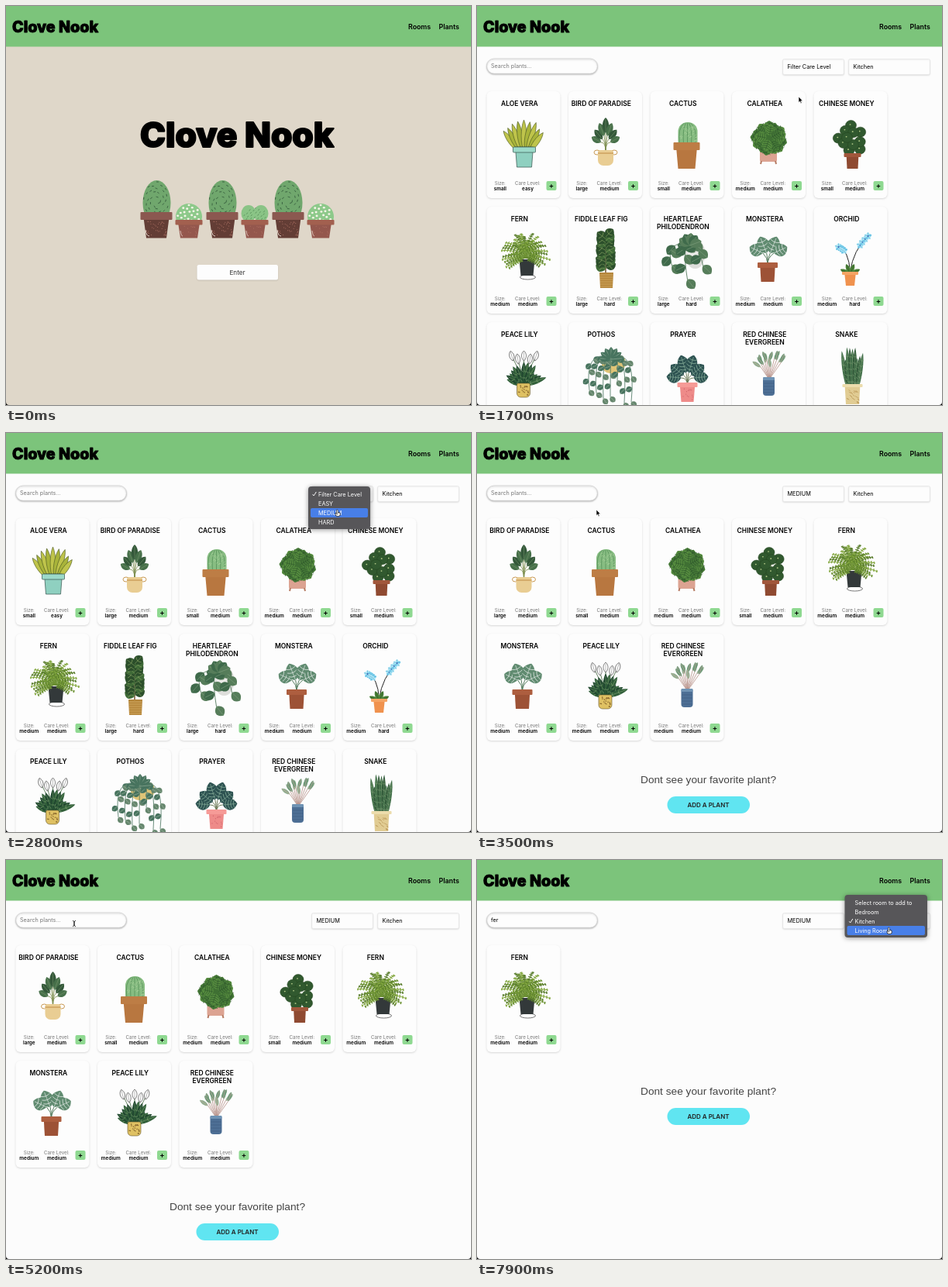
Animation, 600 px wide and 515 px high, one loop 8 s. Source, as an HTML page with a canvas:

```html
<!DOCTYPE html>
<html lang="en">
<head>
<meta charset="utf-8">
<title>Clove Nook</title>
<style>
html, body { margin: 0; width: 100%; height: 100%; overflow: hidden; }
canvas { display: block; }
</style>
</head>
<body>
<canvas id="stage" width="600" height="515"></canvas>
<script>
const g = document.getElementById('stage').getContext('2d');
const LOOP = 8000, STEP = 100;
const NAME = 'Clove Nook';
const SANS = 'Inter, Roboto, sans-serif';
const PAPER = '#fdfdfd';
const { abs, sin, cos, sqrt, floor, PI } = Math;
const rnd = i => { const v = sin(i * 12.9898 + 4) * 43758.5453; return v - floor(v); };

// ---- drawing helpers ----
function text(s, x, y, size, { weight = 400, color = '#000', align = 'left', family = SANS } = {}) {
  g.font = `${weight} ${size}px ${family}`;
  g.fillStyle = color;
  g.textAlign = align;
  g.fillText(s, x, y);
}

function logo(x, y, size, align) {
  text(NAME, x, y, size, { weight: 800, align });
  g.strokeStyle = '#000';
  g.lineWidth = size / 20;
  g.lineJoin = 'round';
  g.strokeText(NAME, x, y);
}

function paint(fill, stroke, width = 0.7) {
  if (fill) { g.fillStyle = fill; g.fill(); }
  if (stroke) { g.strokeStyle = stroke; g.lineWidth = width; g.stroke(); }
}

function box(x, y, w, h, r, fill, stroke, width) {
  g.beginPath();
  g.roundRect(x, y, w, h, r);
  paint(fill, stroke, width);
}

function raised(alpha, blur, ...rect) {
  g.save();
  g.shadowColor = `rgba(0,0,0,${alpha})`;
  g.shadowBlur = blur;
  g.shadowOffsetY = 1;
  box(...rect);
  g.restore();
}

function oval(x, y, rx, ry, fill, stroke, width) {
  g.beginPath();
  g.ellipse(x, y, rx, ry, 0, 0, 7);
  paint(fill, stroke, width);
}

// Tapered pot with a rim on top.
function pot(x, y, top, bottom, h, fill, rim, rimH, stroke) {
  g.beginPath();
  for (const [dx, dy] of [[-top, 0], [top, 0], [bottom, h], [-bottom, h]]) g.lineTo(x + dx, y + dy);
  g.closePath();
  paint(fill, stroke);
  if (rim) box(x - top - 3, y, top * 2 + 6, rimH, 1, rim, stroke);
}

function curve([x, y, cx, cy, ex, ey], color, width = 0.8) {
  g.beginPath();
  g.moveTo(x, y);
  g.quadraticCurveTo(cx, cy, ex, ey);
  paint(null, color, width);
}

const line = (x, y, ex, ey, color, width) => curve([x, y, x, y, ex, ey], color, width);
const pointOn = ([x, y, cx, cy, ex, ey], s, u = 1 - s) =>
  [u * u * x + 2 * u * s * cx + s * s * ex, u * u * y + 2 * u * s * cy + s * s * ey];

// Leaf growing from (x, y); angle 0 points up.
function leaf(x, y, angle, len, w, fill, vein, ribs = 0, outline) {
  g.save();
  g.translate(x, y);
  g.rotate(angle * PI / 180);
  g.beginPath();
  g.moveTo(0, 0);
  g.bezierCurveTo(-w, -len * 0.25, -w, -len * 0.75, 0, -len);
  g.bezierCurveTo(w, -len * 0.75, w, -len * 0.25, 0, 0);
  paint(fill, outline, 0.6);
  if (vein) line(0, 0, 0, -len * 0.9, vein, 0.5);
  for (let i = 1; i <= ribs; i++) {
    const y = -len * i / (ribs + 1.5);
    curve([-w * 0.6, y - 2, 0, y + 2, w * 0.6, y - 2], vein, 0.6);
  }
  g.restore();
}

// Calls f with u going from -1 to 1 in n steps.
function fan(n, f) {
  for (let i = 0; i < n; i++) f(i / (n - 1) * 2 - 1, i);
}

// Spreads n points evenly over a disc, outermost first.
function disc(n, f) {
  for (let i = 0; i < n; i++) {
    const a = i * 137.5, r = sqrt(1 - i / n), t = a * PI / 180;
    f(sin(t) * r, -cos(t) * r, a, i);
  }
}

function specks(n, x, y, w, h, draw) {
  for (let i = 0; i < n; i++) draw(x + rnd(i) * w, y + rnd(i + 50) * h, i);
}

const dots = (n, x, y, w, h, color, r = 0.5) => specks(n, x, y, w, h, (px, py) => oval(px, py, r, r, color));

function vine(stem, n, size, colors, vein) {
  curve(stem, colors[0]);
  for (let k = 1; k <= n; k++) {
    const [x, y] = pointOn(stem, k / n);
    leaf(x, y, (k % 2 ? 120 : 220) + rnd(k + stem[4]) * 30, size, size * 0.55, colors[k % 2], vein);
  }
}

// ---- plants, drawn around the middle of a card's top edge ----
function aloe() {
  fan(9, (u, i) => leaf(u * 7, 78, u * 36, 45 - abs(u) * 10 - rnd(i) * 5, 4.5, i % 2 ? '#a9b43a' : '#bfc44b', null, 0, '#4c5a22'));
  pot(0.5, 72, 11.5, 9.5, 26, '#8fd0c0', '#9cdac9', 7, '#34514b');
}

function birdOfParadise() {
  fan(7, (u, i) => {
    const x = u * 6, y = 54 + 12 * abs(u);
    curve([0, 78, 0, 66, x, y], '#7d8f4e');
    leaf(x, y, u * 60, 20 - 6 * abs(u), 5.5, i % 2 ? '#34583a' : '#47704a', '#7d9a70');
  });
  fan(2, u => oval(u * 11, 79, 4, 3, null, '#c99a55', 1));
  box(-10, 76, 20, 20, [3, 3, 7, 7], '#e9cd93');
  line(-10, 80, 10, 80, '#c99a55', 1.3);
}

function cactus() {
  box(-12, 40, 25, 36, [12, 12, 2, 2], '#87bd82');
  fan(5, u => curve([u * 4, 41, u * 13, 48, u * 10, 68], '#4f8a54', 0.7));
  specks(30, -10, 46, 21, 19, (x, y) => line(x, y, x + 1.5, y - 1.5, '#d5e8ba', 0.5));
  pot(-1, 66, 14, 11, 34, '#b87740', '#bd7d45', 10);
}

function calathea() {
  box(-12, 77, 22, 14, 2, '#dca392');
  fan(2, u => line(u * 9 - 1, 90, u * 10 - 1, 94, '#b77d65', 2));
  oval(0, 60, 20, 17, '#3f7033');
  disc(26, (x, y, a, i) => leaf(x * 10, 61 + y * 8, a, 15, 9, i % 2 ? '#568c3f' : '#477a38', '#284f28', 4));
}

function chineseMoney() {
  disc(11, (x, y) => curve([1, 84, 1, 70, x * 18, 62 + y * 18], '#6c8a4a'));
  disc(11, (x, y) => {
    oval(x * 18, 62 + y * 18, 7, 6.5, '#31592f', '#22421f', 0.5);
    oval(x * 18 - 1, 61 + y * 18, 1, 0.8, '#b6cc8a');
  });
  pot(2, 80, 8, 7, 20, '#8f4a31', '#a1573b', 5);
}

function fern() {
  oval(5, 91, 10, 3, '#fff', '#555', 0.8);
  pot(4, 68, 10, 8, 21, '#33393a');
  fan(36, (u, i) => {
    const a = u * 2.15, len = 20 + rnd(i) * 13, dx = sin(a) * len, dy = cos(a) * len;
    const stem = [2, 66, 2 + dx * 0.5, 60 - dy * 0.7, 2 + dx, 66 - dy];
    const color = ['#6b9131', '#86a943', '#587c2b'][i % 3];
    curve(stem, color, 1);
    for (let s = 0.25; s < 1; s += 0.12) {
      const [x, y] = pointOn(stem, s), r = 4 - s * 2.5;
      line(x - cos(a) * r, y - sin(a) * r, x + cos(a) * r, y + sin(a) * r, color, 1.4);
    }
  });
}

function fiddleLeaf() {
  line(0, 90, 0, 40, '#74532f', 1.5);
  fan(18, (u, i) => leaf(0, 60 - u * 21, (i % 2 ? 1 : -1) * (45 - u * 12 + rnd(i) * 20), 14, 8, i % 3 ? '#2c4f2b' : '#3f6a37', '#91ac69', 1));
  pot(1, 85, 9, 8, 20, '#b5873d');
  for (let y = 88; y < 105; y += 3) line(-7, y, 9, y, '#d8b368', 0.7);
}

function heartleaf() {
  oval(10, 61, 13, 19, '#dededb');
  oval(8, 56, 9, 12, '#ebebe8');
  const greens = ['#3f6a4b', '#567d5a'];
  fan(3, u => vine([4, 46, -8 + u * 22, 45, u * 20, 94 - abs(u) * 18], 5, 15, greens, '#86a585'));
  fan(6, (u, i) => leaf(3, 50, u * 80 - 10, 16, 8, greens[i % 2], '#86a585'));
}

function monstera() {
  fan(4, u => curve([-2, 74, -2, 66, u * 7 - 1, 60], '#587f61', 1));
  fan(4, u => leaf(u * 7 - 1, 60, u * 65, 25 - 6 * abs(u), 11, '#608b70', PAPER, 3));
  pot(-2, 72, 10, 8.5, 25, '#9d5236', '#ad5e3f', 7);
}

function orchid() {
  fan(2, u => {
    const stem = [-1, 84, u * 3, 56, 3 + u * 19, 45 - u * 7];
    curve(stem, '#222', 1);
    for (let s = 0.7; s <= 1; s += 0.1) {
      const [x, y] = pointOn(stem, s);
      for (let k = 0; k < 5; k++) leaf(x, y, k * 72, 5, 2.6, k % 2 ? '#84d4ef' : '#b4e8f6', '#399cc9');
      oval(x, y, 0.9, 0.9, '#395bb0');
    }
  });
  fan(4, u => leaf(-1, 87, u * 65, 14, 3.5, '#4c8338', '#23461f'));
  pot(-1, 84, 7.5, 5.5, 18, '#f0924e', '#f6a464', 4);
}

function peaceLily() {
  fan(5, (u, i) => {
    const x = u * 14, y = 47 + i % 2 * 4;
    line(0, 76, x, y, '#3d6138');
    leaf(x, y + 3, u * 15, 13, 4, '#fff', '#777', 0, '#333');
  });
  fan(15, (u, i) => leaf(0, 82, u * 70, 18 + rnd(i) * 13, 4.5, i % 2 ? '#214830' : '#315f3a', '#86a876', 2));
  box(-9, 79, 17, 18, [2, 2, 5, 5], '#dfc163', '#625326', 0.6);
  dots(20, -7, 82, 13, 12, '#87652c', 0.8);
}

function pothos() {
  const greens = ['#47735e', '#65866d'];
  box(-5, 46, 30, 20, [2, 2, 11, 11], '#dfc477');
  fan(7, (u, i) => vine([8, 46, 6 + u * 34, 34, 6 + u * 27, 72 + rnd(i + 2) * 33], 7, 9, greens, '#a9bfaa'));
  fan(7, u => leaf(7, 48, u * 85, 16, 5, greens[0], '#a9bfaa'));
}

function prayer() {
  fan(6, u => curve([0, 82, 0, 72, u * 8, 64 + abs(u) * 8], '#6f7d5a', 1));
  fan(6, u => leaf(u * 8, 64 + abs(u) * 8, u * 85, 25 - abs(u) * 6, 10, '#2d5251', '#9cc3aa', 4));
  pot(0, 78, 10, 8, 25, '#ee8b89', '#f69b97', 6);
  dots(14, -7, 86, 14, 14, '#cc6069', 0.6);
}

function redEvergreen() {
  fan(11, (u, i) => {
    const a = u * 0.66, len = 12 + rnd(i) * 13, x = sin(a) * len, y = 72 - cos(a) * len;
    line(0, 74, x, y, '#b58f86');
    leaf(x, y, u * 38 + (i % 2 ? 18 : -18), 13, 3, i % 3 ? '#6d9a78' : '#8fae8f', '#d7a4a3');
  });
  box(-8, 72, 15, 23, [1, 1, 4, 4], '#4d6f95');
  box(-8, 71, 15, 4, 1, '#6f93b4');
  for (let y = 79; y < 93; y += 4) line(-7, y, 6, y, '#3d597c', 0.6);
}

function snake() {
  fan(9, (u, i) => leaf(2 + u * 7, 86, u * 8, 36 + rnd(i + 5) * 18, 3.5, i % 2 ? '#2f5838' : '#42704a', '#81a177', 5));
  pot(2, 80, 10, 8.5, 26, '#e1cc93', '#ecdcac', 4);
  specks(24, -6, 87, 15, 16, (x, y) => line(x, y, x + 2, y + 2, '#b18a48', 0.7));
}

const plants = [
  ['ALOE VERA', 'small', 'easy', aloe], ['BIRD OF PARADISE', 'large', 'medium', birdOfParadise],
  ['CACTUS', 'small', 'medium', cactus], ['CALATHEA', 'medium', 'medium', calathea],
  ['CHINESE MONEY', 'small', 'medium', chineseMoney], ['FERN', 'medium', 'medium', fern],
  ['FIDDLE LEAF FIG', 'large', 'hard', fiddleLeaf], ['HEARTLEAF|PHILODENDRON', 'large', 'hard', heartleaf],
  ['MONSTERA', 'medium', 'medium', monstera], ['ORCHID', 'medium', 'hard', orchid],
  ['PEACE LILY', 'medium', 'medium', peaceLily], ['POTHOS', 'medium', 'easy', pothos],
  ['PRAYER', 'medium', 'hard', prayer], ['RED CHINESE|EVERGREEN', 'medium', 'medium', redEvergreen],
  ['SNAKE', 'medium', 'easy', snake]
];

// ---- pages ----
function page(color) {
  g.fillStyle = color;
  g.fillRect(0, 0, 600, 515);
  g.fillStyle = '#7cc47b';
  g.fillRect(0, 0, 600, 52.5);
  logo(8, 33.5, 19.7, 'left');
  text('Rooms', 519, 29.5, 8.8, { weight: 600 });
  text('Plants', 558.5, 29.5, 8.8, { weight: 600 });
}

function tallCactus(x) {
  oval(x + 0.5, 254, 18, 29, '#70a76d');
  disc(36, (dx, dy, a) => {
    const px = x + dx * 17, py = 252 + dy * 25;
    line(px, py, px + cos(a) * 3, py + sin(a) * 3, '#345a3c', 0.9);
  });
  pot(x, 266, 17.5, 13, 33.5, '#633d35', '#8b5850', 10);
  dots(36, x - 13, 278, 26, 18, '#b8796a');
  curve([x - 14, 289, x - 13, 297, x - 9, 297], '#e8d8ce', 1);
}

function smallCactus(x, twin) {
  if (twin) fan(2, u => oval(x + u * 8, 268, 9.5, 11, '#8ac486'));
  else oval(x, 272, 17, 17, '#8dc98a');
  disc(26, (dx, dy) => {
    const px = x + dx * 15, py = 272 + dy * (twin ? 10 : 15);
    if (twin) line(px, py, px + 1.5, py - 2, '#4a7e4d', 0.7);
    else oval(px, py, 1.5, 1.3, '#f6f5e9');
  });
  pot(x, 276, 14.5, 11, 23.5, '#94574d', '#a2604f', 6.5);
  dots(12, x - 10, 284, 20, 12, '#b77768');
  curve([x - 11, 290, x - 10, 297, x - 8, 297], '#ead7cd');
}

function home() {
  page('#dfd7c9');
  logo(298, 181.5, 44.3, 'center');
  for (let i = 0; i < 3; i++) {
    tallCactus(194 + i * 85);
    smallCactus(236 + i * 85, i === 1);
  }
  raised(0.12, 2, 246.5, 334, 104.5, 19.5, 2.5, PAPER);
  text('Enter', 298.5, 346.8, 8.2, { color: '#333', align: 'center' });
}

function card([name, size, care, draw], x, y) {
  raised(0.15, 2.5, x, y, 95, 138, 6, PAPER);
  const mid = { weight: 600, align: 'center' }, label = { color: '#777', align: 'center' };
  name.split('|').forEach((s, i) => text(s, x + 42.3, y + 19 + i * 10, 8.5, mid));
  g.save();
  g.translate(x + 48, y);
  draw();
  g.restore();
  [['Size:', size, 17.3], ['Care Level:', care, 53]].forEach(([title, value, dx]) => {
    text(title, x + dx, y + 120.7, 6.2, label);
    text(value, x + dx, y + 128, 6.4, mid);
  });
  box(x + 77, y + 116, 13, 12, 2, '#8fd991');
  text('+', x + 83.5, y + 125.3, 9.5, mid);
}

function select(x, w, value) {
  raised(0.1, 2, x, 68.5, w, 20, 2, PAPER, '#e4e4e4');
  text(value, x + 6, 81.3, 7.3);
}

function menu(x, y, w, items, checked, mouseY) {
  raised(0.4, 6, x, y, w, 55, 4, '#575659');
  box(x + 3, y + 4 + floor((mouseY - y - 4) / 12) * 12, w - 6, 12, 2, '#487fe8');
  items.forEach((s, i) => text(s, x + 13, y + 12.6 + i * 12, 7.3, { color: '#fff' }));
  const cy = y + 10 + checked * 12;
  line(x + 5.5, cy, x + 7.2, cy + 2, '#fff', 1);
  line(x + 7.2, cy + 2, x + 10.3, cy - 3, '#fff', 1);
}

// ---- timeline ----
const OPEN_PAGE = 1200, OPEN_CARE = 2100, PICK_CARE = 3000, TYPE = 5600, TYPED = 6400, OPEN_ROOM = 7000;
const menuOpen = t => (t >= OPEN_CARE && t < PICK_CARE) || t >= OPEN_ROOM;

function plantsPage(t, mouse) {
  const care = t >= PICK_CARE ? 'medium' : '';
  const query = 'fer'.slice(0, Math.max(0, floor((t - TYPE) / 200) + 1));
  page('#fcfcfc');

  raised(0.25, 2, 12.5, 68, 143, 19.3, 9.6, PAPER, '#ccc');
  text(query || 'Search plants...', 18, 80.3, 7.2, { color: query ? '#000' : '#777' });
  select(394.5, 79, care ? 'MEDIUM' : 'Filter Care Level');
  select(479.5, 105, 'Kitchen');

  const shown = plants.filter(p => (!care || p[2] === care) && p[0].toLowerCase().includes(query));
  shown.forEach((p, i) => card(p, 12.5 + i % 5 * 105.5, 110 + floor(i / 5) * 149));

  const y = Math.ceil(shown.length / 5) * 149;
  text('Dont see your favorite plant?', 298.5, y + 154.3, 13.7,
    { color: '#444', align: 'center', family: '"Liberation Sans", Arial, sans-serif' });
  box(245.5, y + 171, 106.5, 22, 11, '#60e5f1');
  text('ADD A PLANT', 298.5, y + 185, 8, { weight: 600, color: '#222', align: 'center' });

  if (!menuOpen(t)) return;
  if (t < PICK_CARE) menu(390, 69, 80, ['Filter Care Level', 'EASY', 'MEDIUM', 'HARD'], 0, mouse.y);
  else menu(474.5, 45, 106.5, ['Select room to add to', 'Bedroom', 'Kitchen', 'Living Room'], 2, mouse.y);
}

// Mouse moves: start, end, then where it comes to rest.
const moves = [[300, 900, 570, 28], [OPEN_PAGE, 1700, 415, 117], [1700, 2000, 432, 78], [2200, 2600, 428, 103],
  [PICK_CARE, 3500, 154, 99], [3600, 4000, 88, 82], [TYPED, 6600, 147, 69], [6600, 6900, 531, 79], [7200, 7600, 532, 91]];

function mouseAt(t) {
  let x = 366, y = 374;
  for (const [from, to, mx, my] of moves) {
    const s = Math.min(1, Math.max(0, (t - from) / (to - from))), e = s * s * (3 - 2 * s);
    x += (mx - x) * e;
    y += (my - y) * e;
  }
  return { x, y };
}

function cursor(t, { x, y }) {
  if (t < 100 || (t >= TYPE && t < TYPED)) return;
  const inRow = t >= OPEN_PAGE && y > 67 && y < 89;
  g.save();
  g.translate(x, y);
  if (inRow && x < 156) {
    fan(2, u => {
      curve([-2, u * 4, 0, u * 4, 0, 0], '#222', 0.9);
      curve([2, u * 4, 0, u * 4, 0, 0], '#222', 0.9);
    });
  } else if (menuOpen(t) || (y < 40 && x > 515) || (inRow && x > 394)) {
    box(-2.8, -0.6, 6, 5, 2, '#fff', '#111', 0.8);
    box(-1.6, -4, 1.8, 6, 0.9, '#fff', '#111', 0.6);
  } else {
    g.beginPath();
    for (const [px, py] of [[0, 0], [0, 7.5], [1.7, 6], [2.9, 8.7], [4.1, 8.1], [2.9, 5.6], [5.2, 5.4]]) g.lineTo(px, py);
    g.closePath();
    paint('#000', '#fff', 0.6);
  }
  g.restore();
}

function corner(x, dir) {
  g.beginPath();
  g.moveTo(x, 515);
  g.lineTo(x + 4 * dir, 515);
  g.quadraticCurveTo(x, 515, x, 511);
  paint('#000');
}

let last = -1;
function frame(now) {
  const t = floor(now % LOOP / STEP) * STEP;
  if (t !== last) {
    last = t;
    const mouse = mouseAt(t);
    if (t < OPEN_PAGE) home();
    else plantsPage(t, mouse);
    cursor(t, mouse);
    corner(0, 1);
    corner(600, -1);
  }
  requestAnimationFrame(frame);
}
requestAnimationFrame(frame);
</script>
</body>
</html>
```
